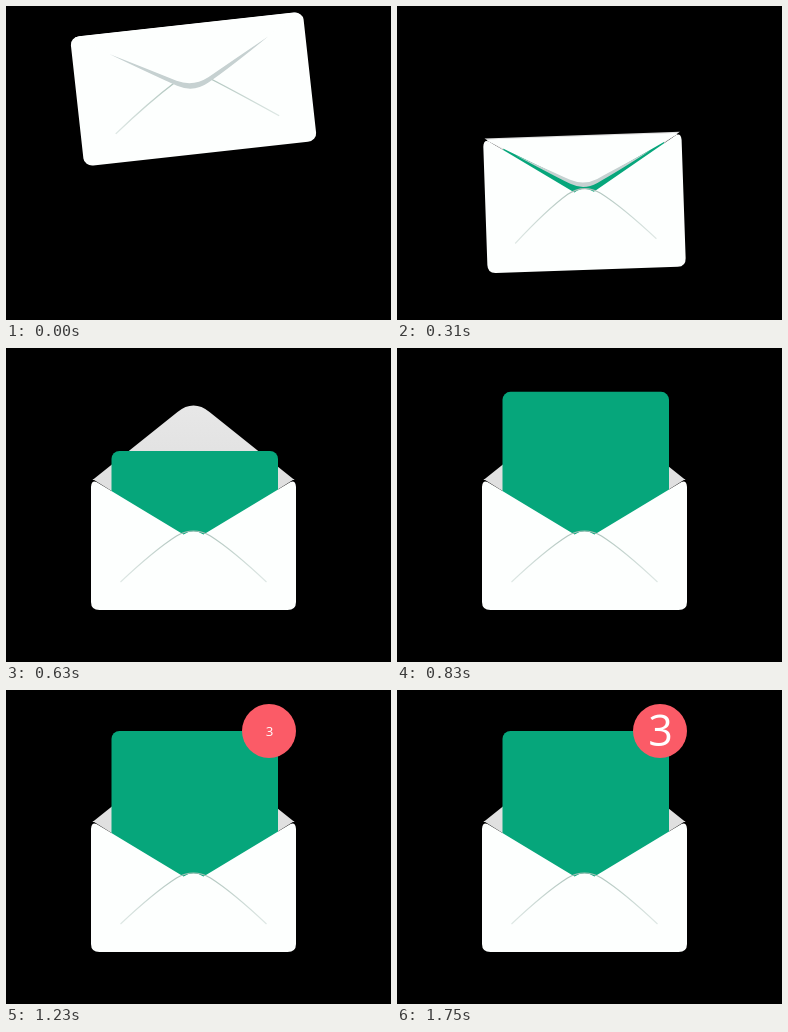
These frames come from a looping animation (385x314 px, 2.95 s). An HTML page with a canvas:

```html
<!DOCTYPE html>
<html lang="en">
<head>
<meta charset="utf-8">
<title>New mail</title>
<style>
  html, body { margin: 0; width: 100%; height: 100%; overflow: hidden; background: #000; }
  canvas { display: block; }
</style>
</head>
<body>
<canvas id="stage" width="385" height="314"></canvas>
<script>
const ctx = document.getElementById('stage').getContext('2d');
const LOOP = 2950, FIRST = 30, STEP = 40, LAST = 1750;
const WHITE = '#fdfffe', GREEN = '#06a67b', RED = '#fb5b67';
const HALF_W = 102.5, HALF_H = 65;
const FLAP_CLOSED = -66, FLAP_OPEN = 81;

const progress = (t, start, end) => Math.min(1, Math.max(0, (t - start) / (end - start)));
const mix = (from, to, p) => from + (to - from) * p;
const easeInOut = p => (1 - Math.cos(Math.PI * p)) / 2;
const easeOut = (p, power) => 1 - (1 - p) ** power;
// Swings from 1 through 0 to the other side and settles at 0.
const swing = (p, halfTurns) => (1 - p) ** 0.65 * Math.cos(Math.PI * halfTurns * p);

function fill(path, color) {
  ctx.fillStyle = color;
  ctx.fill(path);
}

function line(path, color, width) {
  ctx.strokeStyle = color;
  ctx.lineWidth = width;
  ctx.stroke(path);
}

function roundedBox(x, y, w, h, r) {
  const path = new Path2D();
  path.roundRect(x, y, w, h, r);
  return path;
}

// Positive height points up, negative height folds down over the front.
function flapPath(height) {
  const base = -HALF_H, shoulder = base - height * 0.84;
  return new Path2D(`M-101 ${base} L-16 ${shoulder} Q0 ${base - height} 16 ${shoulder} L101 ${base} Z`);
}

// Envelope parts, drawn around its centre.
const outline = roundedBox(-HALF_W, -HALF_H, 2 * HALF_W, 2 * HALF_H, 8);
const inside = new Path2D('M-101 -66 H101 L10 -9 H-10 Z');
const pocket = new Path2D('M-102.5 -58 Q-102 -65 -97 -63 L-10 -10.5 Q0 -17 10 -10.5 L97 -63 Q102 -65 102.5 -58 V57 Q102.5 65 94 65 H-94 Q-102.5 65 -102.5 57 Z');
const openSeam = new Path2D('M-73 37 Q-39 5 -17 -9 Q0 -19 17 -9 Q39 5 73 37');
const closedSeam = new Path2D('M-72 36 Q-40 8 -15 -9 M72 36 Q40 10 15 -9');
const foldShadow = new Path2D('M-70 -44 Q-35 -23 -14 -10 Q0 -2 14 -10 Q35 -23 70 -44 Q35 -18 14 -5 Q0 4 -14 -5 Q-35 -19 -70 -44 Z');

function drawClosedFlap(height) {
  ctx.save();
  ctx.clip(outline);
  fill(flapPath(height), WHITE);
  ctx.translate(0, -HALF_H);
  ctx.scale(1, height / FLAP_CLOSED);
  ctx.translate(0, HALF_H);
  fill(foldShadow, '#c6d1d1');
  ctx.restore();
}

function drawOpenFlap(height) {
  const shade = ctx.createLinearGradient(0, -HALF_H - height, 0, -HALF_H);
  shade.addColorStop(0, '#e8e8e8');
  shade.addColorStop(1, '#e0e0e0');
  fill(flapPath(height), shade);
}

function drawSeam(path, width) {
  const fade = ctx.createLinearGradient(-73, 0, 73, 0);
  fade.addColorStop(0, '#dfe8e5');
  fade.addColorStop(0.5, '#a4bcb4');
  fade.addColorStop(1, '#dfe8e5');
  line(path, fade, width);
}

function drawEnvelope(t) {
  const settle = progress(t, 0, 590);
  const flap = mix(FLAP_CLOSED, FLAP_OPEN, easeInOut(progress(t, 230, 610)));
  const letterTop = mix(-62.5, -156, easeInOut(progress(t, 470, 875)));
  const closed = flap === FLAP_CLOSED;

  ctx.save();
  ctx.translate(187.5, mix(83, 197, easeInOut(progress(t, 0, 140))));
  ctx.rotate(-6.3 * swing(progress(t, 150, 590), 1) * Math.PI / 180);
  ctx.scale(1 + 0.142 * swing(settle, 1.18), 1 + 0.03 * Math.sin(Math.PI * settle));
  if (closed) {
    fill(outline, WHITE);
  } else {
    fill(inside, '#e0e0e0');
    if (flap > 0) drawOpenFlap(flap);
    fill(roundedBox(-82, letterTop, 166.5, 30 - letterTop, 8), GREEN);
    fill(pocket, WHITE);
  }
  drawSeam(closed ? closedSeam : openSeam, 1.2);
  if (flap < 0) drawClosedFlap(flap);
  ctx.restore();
}

function drawSparks(t) {
  if (t < 110 || t > 230) return;
  const near = 11 + (t - 150) * 0.25;
  const size = 1 - 0.5 * progress(t, 150, 270);
  for (let i = -1; i <= 1; i++) {
    const angle = (142 + 45 * i) * Math.PI / 180;
    const far = near + (i ? 10 : 18) * size;
    const path = new Path2D();
    for (const r of [near, far]) path.lineTo(82 + r * Math.cos(angle), 277 + r * Math.sin(angle));
    line(path, WHITE, 1.6);
  }
}

function drawBadge(t) {
  const circle = new Path2D();
  circle.arc(263, 41, 27 * easeOut(progress(t, 1062, 1195), 1.5), 0, 2 * Math.PI);
  fill(circle, RED);

  const size = 43 * easeOut(progress(t, 1150, 1710), 2.4);
  if (size < 1) return;
  ctx.font = `${size}px "Open Sans", sans-serif`;
  ctx.textAlign = 'center';
  ctx.fillStyle = '#fff';
  ctx.fillText('3', 263.5, 41 + size * 0.357);
}

function draw(now) {
  const time = now % LOOP;
  const t = time < FIRST ? 0 : Math.min(LAST, FIRST + STEP * Math.floor((time - FIRST) / STEP));
  ctx.fillStyle = '#000';
  ctx.fillRect(0, 0, 385, 314);
  drawSparks(t);
  drawEnvelope(t);
  drawBadge(t);
}

const start = performance.now();
function tick() {
  draw(performance.now() - start);
  requestAnimationFrame(tick);
}
tick();
</script>
</body>
</html>
```
